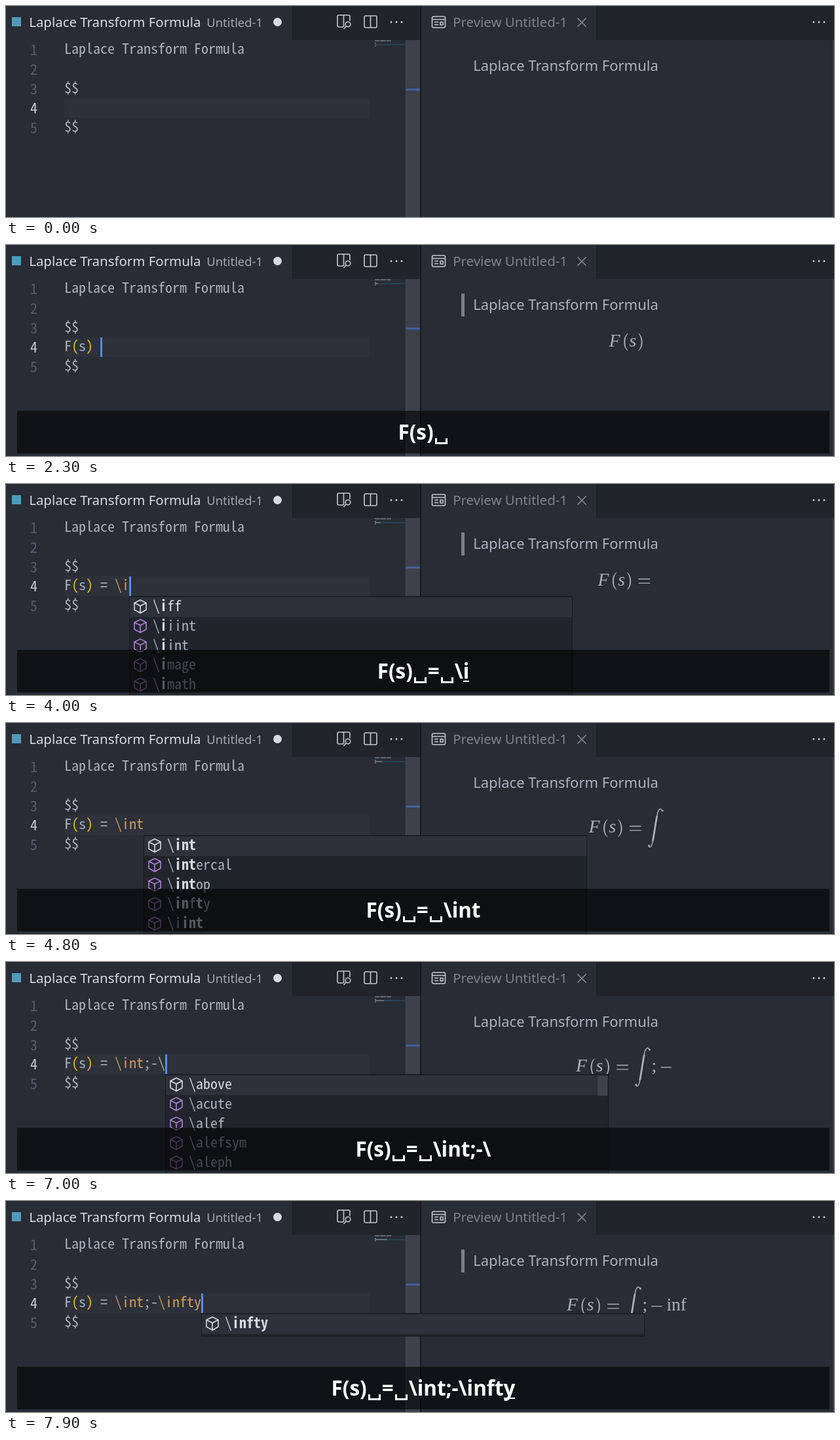
An HTML page for the animation above (8000 ms loop, 1264 by 322 pixels).

```html
<!DOCTYPE html>
<html lang="en">
<head>
<meta charset="utf-8">
<title>Live formula preview</title>
<style>
html, body { margin: 0; width: 100%; height: 100%; overflow: hidden; background: #282c34; }
svg { display: block; }
text { white-space: pre; }
.ui { font-family: "Noto Sans", sans-serif; }
.code { font: 22px "Noto Sans Mono CJK JP", "Noto Sans Mono", monospace; fill: #abb2bf; }
.math { font-family: "Liberation Serif", serif; font-size: 27.5px; fill: #abb2bf; }
.line { fill: none; stroke: #c5c8ce; stroke-width: 1.6; }
#keys {
  position: absolute; left: 17px; top: 253px; width: 1240px; height: 65px;
  background: rgba(0, 0, 0, .6); color: #fff; text-align: center; white-space: nowrap;
  font: bold 31.43px/63px "Noto Sans", sans-serif;
}
#keys span { position: relative; }
#keys .held::after {
  content: ""; position: absolute; left: 0; right: 0; bottom: 4px; height: 2px; background: #fff;
}
#keys i {
  display: inline-block; box-sizing: border-box; width: 19px; height: 9px; margin: 0 2px;
  border: 3px solid #fff; border-top: 0; vertical-align: -7px;
}
</style>
</head>
<body>
<svg width="1264" height="322" viewBox="0 0 1264 322">
  <rect width="1264" height="322" fill="#282c34"/>
  <path d="M437 0H633V52H437ZM901 0H1264V52H901Z" fill="#21252b"/>
  <path d="M437.5 0V52M901.5 0V52" stroke="#1b1e23"/>
  <path d="M633 0V322" stroke="#181a1f" stroke-width="2"/>
  <path d="M1262.5 52V322" stroke="#3a3f48"/>

  <rect x="9" y="17" width="14" height="14" fill="#519aba"/>
  <g class="ui" font-size="20.43">
    <text x="35.2" y="32" fill="#d7dae0">Laplace Transform Formula</text>
    <text x="306.3" y="32" font-size="18.4" fill="#a4a9b3">Untitled-1</text>
    <text x="682.2" y="32" fill="#7f838c">Preview Untitled-1</text>
    <text x="713.2" y="99" font-size="22" fill="#abb2bf">Laplace Transform Formula</text>
  </g>
  <circle cx="414.5" cy="24.5" r="6.5" fill="#d7dae0"/>

  <g class="line">
    <path d="M515 32H508Q506 32 506 30V16Q506 14 508 14H523Q525 14 525 16V23M515.5 14V32"/>
    <circle cx="522" cy="28" r="3.8"/>
    <path d="M519 31L515.5 35"/>
    <rect x="547" y="15" width="19" height="18" rx="2"/>
    <path d="M556.5 15V33"/>
    <rect x="650.5" y="16" width="20" height="17" rx="2"/>
    <path d="M651 20.5H670M654 24.5H660M654 28.5H660M663 24.5H667V29H663Z"/>
    <path d="M872.5 18.5L885.5 31.5M885.5 18.5L872.5 31.5" stroke="#868a92"/>
  </g>
  <path d="M588 24.5h0m8 0h0m8 0h0M1233 24.5h0m8 0h0m8 0h0" stroke="#c5c8ce" stroke-width="3" stroke-linecap="round"/>

  <rect x="89" y="141" width="466" height="30" fill="#2c313a"/>
  <path d="M563 59H609" stroke="#264552" stroke-width="2"/>
  <path d="M563 53H570M571 53H580M581 53H588" stroke="#767c87" stroke-width="1.5"/>
  <path d="M563 57H565M563 61H565" stroke="#767c87" stroke-width="1.5"/>
  <rect x="610" y="52" width="22" height="270" fill="#3d414b"/>
  <path d="M610.5 52V322" stroke="#4a4e58"/>
  <rect x="610" y="126" width="22" height="3" fill="#41609c"/>
  <g id="page"></g>
  <g id="live"></g>
</svg>
<div id="keys"></div>

<script>
const LOOP = 8000, LEFT = 89, CELL = 11, ROW = 29.8, EM = 26.62;
const $ = id => document.getElementById(id);

// time, character, how long it stays underlined
const strokes = [
  [500, 'F', 100], [1200, '(', 300], [1500, 's', 100], [1800, ')', 300],
  [2300, ' '], [2600, '=', 100], [2900, ' '], [3500, '\\', 100],
  [4000, 'i', 100], [4100, 'n', 100], [4300, 't', 200], [5400, ';', 100],
  [6000, '-', 200], [6700, '\\', 100], [7100, 'i', 100], [7200, 'n', 100],
  [7500, 'f', 100], [7800, 't', 100], [7900, 'y', 100]
];

// time, number of leading symbols, extra symbol, total width in em
const renders = [
  [800, 1, '', .782], [1600, 4, '', 2.029], [3000, 5, '', 3.085], [3800, 5, '', 3.335],
  [4500, 6, '', 4.363], [5700, 7, '', 4.641], [6400, 8, '', 5.586], [7000, 8, '', 5.836],
  [7400, 8, '∈', 6.531], [7700, 8, 'inf', 6.893]
];

// offsets in em
const symbols = [['F', .03], ['(', .782], ['s', 1.185], [')', 1.64], ['=', 2.307], ['∫', 3.363], [';', 4.363], ['−', 4.808]];
const extras = { '∈': 5.864, inf: 5.753 };

const hints = {
  '\\': ['above', 'acute', 'alef', 'alefsym', 'aleph'],
  '\\i': ['iff', 'iiint', 'iint', 'image', 'imath'],
  '\\in': ['in', 'inf', 'infty', 'injlim', 'int'],
  '\\int': ['int', 'intercal', 'intop', 'infty', 'iint'],
  '\\inf': ['inf', 'infty'],
  '\\inft': ['infty'],
  '\\infty': ['infty']
};

const rect = (x, y, w, h, fill, more = '') =>
  `<rect x="${x}" y="${y}" width="${w}" height="${h}" fill="${fill}" ${more}/>`;

// monospaced text; style(i) gives attributes for a single character
function code(x, y, s, style = () => '') {
  const chars = [...s];
  const xs = chars.map((c, i) => x + i * CELL).join(' ');
  return `<text class="code" x="${xs}" y="${y}">` +
    chars.map((c, i) => `<tspan ${style(i)}>${c}</tspan>`).join('') + '</text>';
}

const baseline = n => 73 + ROW * (n - 1);

function page() {
  const lines = ['Laplace Transform Formula', '', '$$', '', '$$'];
  return lines.map((s, i) =>
    code(37, baseline(i + 1) + 2, String(i + 1), () => `fill="${i == 3 ? '#c8cdd6' : '#565d6d'}"`) +
    code(LEFT, baseline(i + 1), s)).join('');
}

function symbol(c) {
  const paren = 'M2.5-6.6C2.5-13 4.8-17.5 8.2-20H8.9C5.8-16.5 4.4-12.3 4.4-6.6S5.8 3.3 8.9 6.7H8.2C4.8 4.2 2.5-.2 2.5-6.6Z';
  const stroke = (d, w = 1.3) => `<path d="${d}" fill="none" stroke="#abb2bf" stroke-width="${w}"/>`;
  switch (c) {
    case '(': return `<path d="${paren}" fill="#abb2bf"/>`;
    case ')': return `<path d="${paren}" fill="#abb2bf" transform="translate(10.4)scale(-1 1)"/>`;
    case '=': return stroke('M1.5-9.8H19.2M1.5-3.5H19.2');
    case '−': return stroke('M2.2-6.6H18.5');
    case '∈': return stroke('M15.6-14H9.8A7.2 7.4 0 0 0 9.8.8H15.6M2.6-6.6H15.6');
    case '∫': return stroke('M2.6 20.5C4.5 23.5 7.3 22.8 9 12M15.2-24.5C17-36.5 20.5-38 23.3-34', 1.4) +
      stroke('M8.8 13C11 3 13.2-15 15.4-25.5', 2.7) +
      '<path d="M3 20h0M23.6-33.5h0" stroke="#abb2bf" stroke-width="3" stroke-linecap="round"/>';
    default: return `<text class="math" ${/[Fs]/.test(c) ? 'font-style="italic"' : ''}>${c}</text>`;
  }
}

function formula([, count, extra, width]) {
  const base = count > 5 ? 167.3 : count > 1 ? 154.8 : 154;
  const list = symbols.slice(0, count);
  if (extra) list.push([extra, extras[extra]]);
  return list.map(([c, x]) =>
    `<g transform="translate(${947 + (x - width / 2) * EM} ${base})">${symbol(c)}</g>`).join('');
}

function source(text) {
  const open = /\([^)]*$/.test(text), s = open ? text + ')' : text;
  const commands = [...s.matchAll(/\\[a-z]+/g)];
  const colour = i => /[()]/.test(s[i]) ? '#e5b42e'
    : commands.some(m => i >= m.index && i < m.index + m[0].length) ? '#d19a66' : '#abb2bf';
  let out = '';
  if (text.length > 1 && (open || text.endsWith(')'))) {
    for (const i of [s.indexOf('('), s.indexOf(')')])
      out += rect(LEFT + i * CELL + .5, 141.5, CELL, 29, '#515a6b40', 'stroke="#6c737c"');
    out += rect(617, 128, 9, 24, '#85888f');
  }
  out += rect(563, 58, Math.max(1, s.length), 1.5, '#767c87');
  return out + code(LEFT, baseline(4), s, i => `fill="${colour(i)}"`);
}

// indexes of the characters of word that match the typed query
function matches(word, query) {
  const at = word.indexOf(query);
  if (at >= 0) return [...query].map((c, i) => at + i);
  let from = 0;
  return [...query].map(c => from = word.indexOf(c, from) + 1).map(i => i - 1);
}

function popup(x, tail) {
  const words = hints[tail], width = 676;
  let out = rect(x + .5, 171.5, width, words.length * ROW + 5, '#21252b', 'stroke="#181a1f"') +
    rect(x + 1, 173, width - 1, 30, '#2c313a');
  if (tail == '\\') out += rect(x + 660, 174, 15, 30, '#3d424d');
  words.forEach((word, row) => {
    const y = 187 + row * ROW, hit = matches(word, tail.slice(1));
    const colour = row ? '#abb2bf' : '#d7dae0';
    out += `<path class="line" transform="translate(${x + 17} ${y})" style="stroke:${row ? '#b180d7' : '#d7dae0'}"
      d="M0-10L9-5.5V5L0 10L-9 5V-5.5ZM-9-5.5L0-1L9-5.5M0-1V10"/>`;
    out += code(x + 36, y + 7, '\\' + word,
      i => hit.includes(i - 1) ? 'fill="#d7dae0" font-weight="bold"' : `fill="${colour}"`);
  });
  return out;
}

function caption(text, held) {
  return [...text].map((c, i) => c == ' ' ? '<i></i>'
    : held && i == text.length - 1 ? `<span class="held">${c}</span>` : c).join('');
}

function draw(t) {
  const typed = strokes.filter(k => k[0] <= t);
  const text = typed.map(k => k[1]).join('');
  const last = typed[typed.length - 1];
  const render = renders.filter(r => r[0] <= t).pop();
  let out = '';
  if (render) out += formula(render);
  if (last) {
    const x = LEFT + text.length * CELL, tail = text.match(/\\[a-z]*$/);
    if (!render || last[0] > render[0]) out += rect(695, 74, 5, 35, '#7d7f85');
    out += source(text);
    if ((t - last[0]) % 1000 < 500) out += rect(x, 141, 3, 30, '#528bff');
    if (tail) out += popup(x, tail[0]);
  }
  $('live').innerHTML = out;
  $('keys').hidden = !last;
  $('keys').innerHTML = last ? caption(text, t < last[0] + (last[2] || 0)) : '';
}

let shown = -1;
function tick() {
  const t = Math.floor(performance.now() % LOOP / 100) * 100;
  if (t != shown) draw(shown = t);
  requestAnimationFrame(tick);
}

$('page').innerHTML = page();
tick();
</script>
</body>
</html>
```
